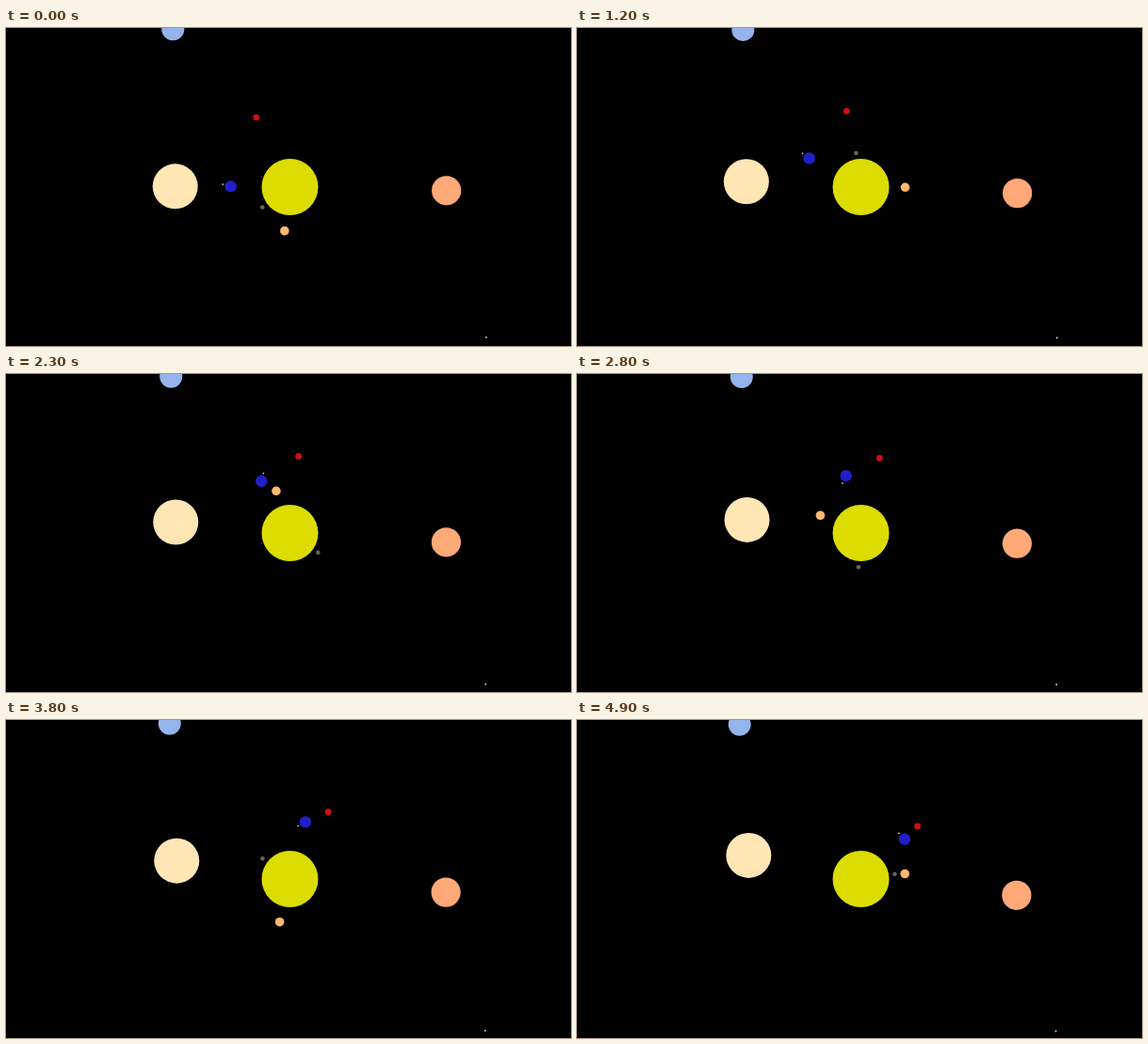
Animation, 600 px wide and 338 px high, one loop 5 s. Source, as an HTML page:

```html
<!DOCTYPE html>
<html lang="en">
<head>
<meta charset="utf-8">
<title>Planets in orbit</title>
<style>
  html, body { margin: 0; width: 100%; height: 100%; overflow: hidden; background: #000; }
  svg { display: block; width: 100vw; height: 100vh; }
</style>
</head>
<body>
<svg id="sky" viewBox="0 0 600 338"></svg>
<script>
const LOOP = 5000, STEP = 100;
const sun = { x: 301.5, y: 169 };

// Orbit radius, start angle and degrees per step (clockwise), size, colour
const bodies = [
  { name: 'sun', orbit: 0, start: 0, speed: 0, size: 30, fill: '#dcdc00' },
  { name: 'mercury', orbit: 36.3, start: 143.6, speed: 12.267, size: 2.3, fill: '#6c645a' },
  { name: 'venus', orbit: 47, start: 96.9, speed: -10.011, size: 4.8, fill: '#ffb870' },
  { name: 'earth', orbit: 62.8, start: 180.6, speed: 2.96, size: 6.2, fill: '#2020c8' },
  { name: 'moon', orbit: 8.7, start: 194.2, speed: 39.57, size: 0.9, fill: '#cccccc', around: 'earth' },
  { name: 'mars', orbit: 82.1, start: 244.2, speed: 1.572, size: 3.4, fill: '#cc1010' },
  { name: 'jupiter', orbit: 121.8, start: 180.3, speed: 0.2505, size: 24, fill: '#ffe6b4' },
  { name: 'saturn', orbit: 166.25, start: 1.31, speed: 0.1008, size: 15.6, fill: '#ffa878' },
  { name: 'uranus', orbit: 208.8, start: 233.5, speed: -0.0345, size: 12, fill: '#96b4ec' },
  { name: 'pluto', orbit: 262.7, start: 37.48, speed: 0.0115, size: 1, fill: '#cccccc' }
];

// Orbital clock: runs slower at first and once more in the middle
const clock = [[0, 0], [12, 9.64], [18, 15.64], [28, 25.31], [50, 47.31]];

function orbitTime(step) {
  const i = clock.findIndex(([s]) => s > step);
  const [s0, t0] = clock[i - 1], [s1, t1] = clock[i];
  return t0 + (t1 - t0) * (step - s0) / (s1 - s0);
}

const sky = document.getElementById('sky');
for (const b of bodies) {
  b.dot = document.createElementNS('http://www.w3.org/2000/svg', 'circle');
  b.dot.setAttribute('r', b.size);
  b.dot.setAttribute('fill', b.fill);
  sky.append(b.dot);
}

function draw(ms) {
  const t = orbitTime(Math.floor((ms % LOOP) / STEP));
  const places = {};
  for (const b of bodies) {
    const hub = b.around ? places[b.around] : sun;
    const a = (b.start + b.speed * t) * Math.PI / 180;
    const p = places[b.name] = {
      x: hub.x + b.orbit * Math.cos(a),
      y: hub.y + b.orbit * Math.sin(a)
    };
    b.dot.setAttribute('cx', p.x.toFixed(3));
    b.dot.setAttribute('cy', p.y.toFixed(3));
  }
}

const begin = performance.now();
function tick() {
  draw(performance.now() - begin);
  requestAnimationFrame(tick);
}
draw(0);
requestAnimationFrame(tick);
</script>
</body>
</html>
```
